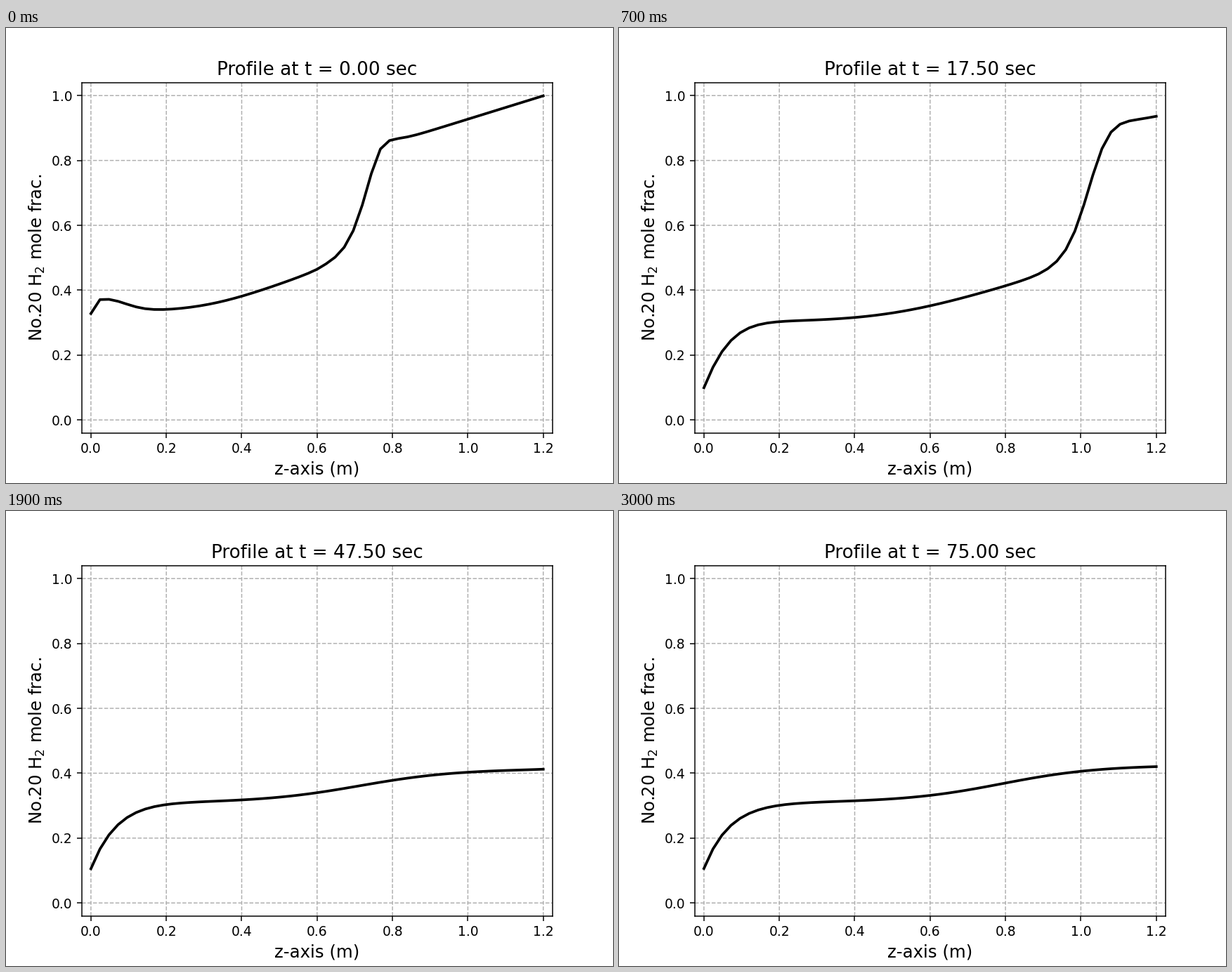
A matplotlib script that plays this animation: 864 by 648 pixels, repeating every 3.1 s.

```python
import numpy as np
import matplotlib.pyplot as plt
from matplotlib.animation import FuncAnimation

FRAMES = 31
STEP = 2.5  # simulated seconds per frame
z = np.linspace(0, 1.2, 51)


def sigmoid(x):
    return 1 / (1 + np.exp(-x))


def ramp(x, width):
    """Zero on the left, slope one on the right, with a soft corner."""
    return width * np.logaddexp(0, x / width)


def ease(t, start, end, tau):
    return end + (start - end) * np.exp(-t / tau)


def inlet(t):
    """A small bump that quickly gives way to a dip of the feed gas."""
    fade = np.exp(-t / 1.5)
    bump = .038 * np.exp(-((z - .035) / .08) ** 2) * (1 - 1.2 * np.exp(-z / .006))
    dip = .204 * np.exp(-14.5 * z - 95 * np.exp(-t / 20) * z ** 2)
    return fade * bump - (1 - fade) * dip


def behind(t):
    """Level behind the front: a rising ramp that drifts out of the bed,
    leaving a broad S-shaped step."""
    def at(*values):
        return np.interp(t, [0, 7.5, 17.5, 27.5, 37.5, 75], values)

    base = at(.334, .295, .303, .309, .309, .310)
    corner = at(.307, .294, .5, .87, 1.08, 1.9)
    width = at(.072, .06, .108, .05, .05, .05)
    slope = at(.43, .36, .36, .225, .225, .225)
    step = at(0, 0, 0, .09, .1, .115)
    return (base + slope * ramp(z - corner, width)
            + step * sigmoid((z - .58 - .0028 * t) / .13) + inlet(t))


def ahead(t, s):
    """Level ahead of the front, by distance s from its centre."""
    corner = ease(t, .10, .16, 9)
    width = ease(t, .02, .04, 9)
    return ease(t, .865, .933, 9) + ease(t, .36, .30, 9) * ramp(s - corner, width)


def profile(t):
    s = z - .0156 * t - ease(t, .727, .7465, 3)
    bend = np.where(s < 0, ease(t, 75, 17, 3), ease(t, 350, 70, 3))
    front = sigmoid(ease(t, 42, 34, 3) * s + bend * np.minimum(s * s, .01))
    low = behind(t)
    return low + (ahead(t, s) - low) * front


fig, ax = plt.subplots(figsize=(6.4, 4.8), dpi=135)
line, = ax.plot(z, profile(0), "k-", lw=2)
ax.set_xlim(-.024, 1.224)
ax.set_ylim(-.04, 1.04)
ax.set_xlabel("z-axis (m)", fontsize=13)
ax.set_ylabel("No.20 H$_2$ mole frac.", fontsize=13)
title = ax.set_title("", fontsize=14)
ax.grid(linestyle="--", snap=False)


def update(n):
    t = n * STEP
    line.set_ydata(profile(t))
    title.set_text(f"Profile at t = {t:.2f} sec")
    return line, title


anim = FuncAnimation(fig, update, frames=FRAMES, interval=100,
                     repeat=True, repeat_delay=0, blit=False)
plt.show()
```
